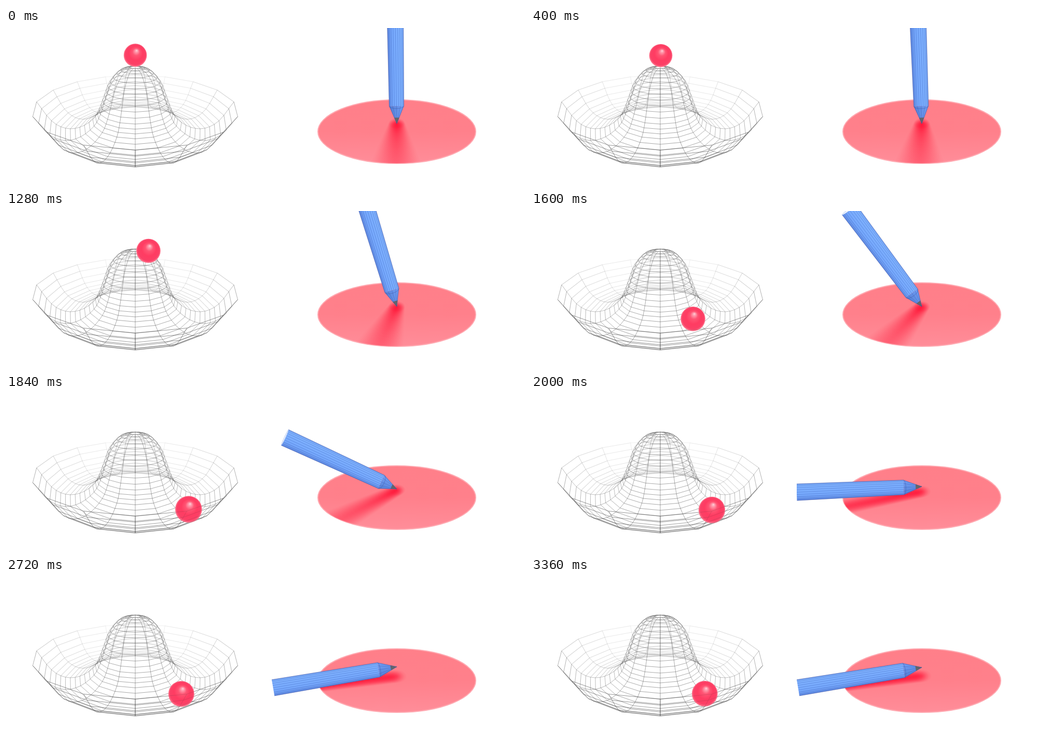
An HTML page with a canvas that plays this animation: 1000x300 px, repeating every 3760 ms.

```html
<!DOCTYPE html>
<html lang="en">
<head>
<meta charset="utf-8">
<title>Unstable equilibrium</title>
<style>
  html, body { margin: 0; width: 100%; height: 100%; overflow: hidden; background: #fff; }
  canvas { display: block; width: 1000px; height: 300px; }
</style>
</head>
<body>
<canvas id="stage" width="1000" height="300"></canvas>
<script>
const stage = document.getElementById('stage');
const ctx = stage.getContext('2d');
const LOOP = 3760, STEP = 80, LAST = 3360;

// Cubic interpolation through rows of [x, value, value, ...].
function curve(rows, x) {
  const last = rows.length - 1;
  x = Math.min(Math.max(x, rows[0][0]), rows[last][0]);
  let i = 0;
  while (i < last - 1 && x > rows[i + 1][0]) i++;
  const a = rows[i], b = rows[i + 1], span = b[0] - a[0], s = (x - a[0]) / span;
  const slope = (k, c) => {
    const p = rows[Math.max(k - 1, 0)], q = rows[Math.min(k + 1, last)];
    return (q[c] - p[c]) / (q[0] - p[0]) * span;
  };
  return a.slice(1).map((v, j) => {
    const c = j + 1, w = b[c], m = slope(i, c), n = slope(i + 1, c);
    return v + s * (m + s * (3 * (w - v) - 2 * m - n + s * (2 * (v - w) + m + n)));
  });
}

// Perspective cameras: x to the right, y away from the viewer, z up.
const camera = (cx, focal, distance, sin, cos, drop) => (x, y, z) => {
  const depth = distance + y * cos - z * sin;
  const scale = focal / depth;
  return { x: cx + x * scale, y: 150 + (drop - z * cos - y * sin) * scale, scale, depth };
};
const hatView = camera(249, 611, 3.23, 0.36, 0.933, 0);
const discView = camera(753, 550, 3.74, 0.332, 0.943, 0.238);
const EYE = [0, -3.448, 1.466];

// ---- Hat ----
const SIDES = 16, SUB = 3;
const profile = [
  [0, .406], [.14, .375], [.25, .26], [.31, .115], [.37, -.04],
  [.44, -.155], [.58, -.245], [.73, -.256], [.87, -.17], [1, .04]
].map((p, i) => [i, ...p]);
const RINGS = (profile.length - 1) * SUB;

function hatPoint(ring, side) {
  const [r, z] = curve(profile, ring / SUB);
  const a = side * 2 * Math.PI / SIDES;
  return hatView(r * Math.sin(a), r * Math.cos(a), z);
}

function wire(g, p, q) {
  const depth = (p.depth + q.depth) / 2;
  const alpha = Math.min(.72, Math.max(.08, .1 + (4.12 - depth) * .4));
  g.strokeStyle = `rgba(60,60,60,${alpha})`;
  g.beginPath();
  g.moveTo(p.x, p.y);
  g.lineTo(q.x, q.y);
  g.stroke();
}

function makeHat(firstRing, frontOnly) {
  const layer = document.createElement('canvas');
  layer.width = 500;
  layer.height = 300;
  const g = layer.getContext('2d');
  g.lineWidth = .75;
  for (let ring = firstRing; ring <= RINGS; ring++) {
    for (let side = 0; side < SIDES; side++) {
      const p = hatPoint(ring, side);
      if (frontOnly && p.depth > 3.1) continue;
      wire(g, p, hatPoint(ring, side + 1));
      if (ring > firstRing) wire(g, p, hatPoint(ring - 1, side));
    }
  }
  return layer;
}
const hat = makeHat(1, false);
const frontWires = makeHat(23, true);

// ---- Ball ----
const ballRadius = [
  [0, .001], [400, .01], [960, .08], [1200, .17], [1400, .32], [1600, .54],
  [1760, .745], [1880, .825], [2000, .79], [2320, .66], [2440, .648],
  [2700, .722], [2960, .695], [3360, .703]
];
const ballHeight = [
  [0, .52], [.08, .505], [.2, .46], [.33, .3], [.43, .05], [.5, -.085],
  [.56, -.127], [.66, -.14], [.72, -.13], [.79, -.09], [.85, -.04]
];

function drawBall(t) {
  const [r] = curve(ballRadius, t);
  const [z] = curve(ballHeight, r);
  const p = hatView(r * .545, -r * .838, z);
  const size = .111 * p.scale;
  const shade = ctx.createRadialGradient(
    p.x + size * .12, p.y - size * .42, 0, p.x, p.y, size);
  shade.addColorStop(0, '#ffd3da');
  shade.addColorStop(.12, '#ff9aac');
  shade.addColorStop(.32, '#ff5473');
  shade.addColorStop(.6, '#ff3c62');
  shade.addColorStop(.88, '#fb4066');
  shade.addColorStop(1, '#ff7b92');
  ctx.save();
  ctx.beginPath();
  ctx.arc(p.x, p.y, size, 0, 2 * Math.PI);
  ctx.fillStyle = shade;
  ctx.fill();
  ctx.clip();
  ctx.globalAlpha = .3;
  ctx.drawImage(frontWires, 0, 0);
  ctx.restore();
}

// ---- Pencil ----
const LENGTH = 1.5, CONE = .245, GIRTH = .094;
const HEADING = [-.942, -.335];
const LANDING = 2033;

const hop = (t, start, span, height) =>
  t > start && t < start + span ? height * (1 - (2 * (t - start) / span - 1) ** 2) : 0;

function pencilPose(t) {
  const fall = 33.5 * Math.exp(.00232 * (t - 1600)) * Math.PI / 180;
  if (t < LANDING) return { tilt: fall, tip: Math.max(0, (t - 1800) / 200) * .043 };
  const rest = .045 + .028 * Math.min(1, (t - LANDING) / 450);
  const tip = rest + hop(t, LANDING, 470, .185) + hop(t, LANDING + 470, 230, .045);
  return { tilt: Math.PI / 2 + Math.asin((tip - .025) / LENGTH), tip };
}

function fillPoly(points, fill) {
  ctx.beginPath();
  points.forEach(([x, y]) => ctx.lineTo(x, y));
  ctx.closePath();
  ctx.fillStyle = fill;
  ctx.fill();
}

function strokeLine(a, b) {
  ctx.beginPath();
  ctx.moveTo(...a);
  ctx.lineTo(...b);
  ctx.stroke();
}

function drawDisc(along) {
  ctx.save();
  ctx.beginPath();
  ctx.ellipse(753, 200.5, 152, 61.5, 0, 0, 2 * Math.PI);
  const base = ctx.createLinearGradient(0, 139, 0, 262);
  base.addColorStop(0, '#ff7f89');
  base.addColorStop(.5, '#ff808b');
  base.addColorStop(1, '#ff8d99');
  ctx.fillStyle = base;
  ctx.fill();
  ctx.strokeStyle = '#ffa8b0';
  ctx.lineWidth = 2;
  ctx.stroke();
  ctx.clip();
  // Soft shadow cast towards the viewer, wider and weaker with height.
  for (let i = 0; i <= 40; i++) {
    const [x, y, z] = along(LENGTH * i / 40);
    const h = Math.max(0, z);
    const p = discView(x, Math.max(-2, y - 1.5 * h), 0);
    const size = (.1 + .2 * h) * p.scale;
    const alpha = .6 / (1 + 12 * h);
    const blob = ctx.createRadialGradient(0, 0, 0, 0, 0, size);
    blob.addColorStop(0, `rgba(255,0,40,${alpha})`);
    blob.addColorStop(.5, `rgba(255,0,40,${alpha * .5})`);
    blob.addColorStop(1, 'rgba(255,0,40,0)');
    ctx.save();
    ctx.translate(p.x, p.y);
    ctx.scale(1.1, .75);
    ctx.fillStyle = blob;
    ctx.fillRect(-size, -size, 2 * size, 2 * size);
    ctx.restore();
  }
  ctx.restore();
}

function drawPencil(along, dir) {
  const tip = discView(...along(0));
  const neck = discView(...along(CONE));
  const end = discView(...along(LENGTH));
  const len = Math.hypot(end.x - neck.x, end.y - neck.y);
  const u = [(end.x - neck.x) / len, (end.y - neck.y) / len];
  const n = [-u[1], u[0]];
  const angle = Math.atan2(n[1], n[0]);
  const at = (p, k) => [p.x + n[0] * k * GIRTH * p.scale, p.y + n[1] * k * GIRTH * p.scale];
  const facing = s => {
    const view = along(s).map((v, i) => EYE[i] - v);
    return view.reduce((sum, v, i) => sum + v * dir[i], 0) / Math.hypot(...view);
  };
  const tipPoint = [tip.x, tip.y];

  const blue = ctx.createLinearGradient(...at(neck, -1), ...at(neck, 1));
  blue.addColorStop(0, '#6794ea');
  blue.addColorStop(.3, '#76a9fd');
  blue.addColorStop(1, '#80b3ff');
  fillPoly([at(neck, -1), at(neck, 1), at(end, 1), at(end, -1)], blue);

  const cone = ctx.createLinearGradient(...at(neck, -1), ...at(neck, 1));
  cone.addColorStop(0, '#5580d6');
  cone.addColorStop(1, '#729ff5');
  fillPoly([at(neck, -1), at(neck, 1), tipPoint], cone);

  ctx.lineWidth = .7;
  ctx.strokeStyle = 'rgba(50,85,175,.5)';
  for (let i = -5; i <= 5; i++) {
    const k = Math.sin(i * Math.PI / 11);
    strokeLine(at(neck, k), at(end, k));
    if (i % 2 === 0) strokeLine(at(neck, k), tipPoint);
  }

  const mix = k => at(neck, k).map((v, i) => v + (tipPoint[i] - v) * .66);
  fillPoly([mix(-1), mix(1), tipPoint], '#62656c');

  const neckFacing = facing(CONE);
  ctx.strokeStyle = 'rgba(60,75,150,.6)';
  ctx.beginPath();
  ctx.ellipse(neck.x, neck.y, GIRTH * neck.scale, GIRTH * neck.scale * Math.abs(neckFacing),
    angle, 0, Math.PI, neckFacing < 0);
  ctx.stroke();

  ctx.strokeStyle = 'rgba(70,75,150,.5)';
  [-1, 1].forEach(k => {
    strokeLine(at(neck, k), at(end, k));
    strokeLine(at(neck, k), tipPoint);
  });

  const endFacing = facing(LENGTH);
  if (endFacing > 0) {
    ctx.beginPath();
    ctx.ellipse(end.x, end.y, GIRTH * end.scale, GIRTH * end.scale * endFacing,
      angle, 0, 2 * Math.PI);
    ctx.fillStyle = '#eef3fc';
    ctx.fill();
    ctx.strokeStyle = 'rgba(110,150,230,.6)';
    ctx.stroke();
  }
}

function drawRight(t) {
  const { tilt, tip } = pencilPose(t);
  const dir = [HEADING[0] * Math.sin(tilt), HEADING[1] * Math.sin(tilt), Math.cos(tilt)];
  const along = s => [dir[0] * s, dir[1] * s, tip + dir[2] * s];
  ctx.save();
  ctx.beginPath();
  ctx.rect(512, 0, 488, 300);
  ctx.clip();
  drawDisc(along);
  drawPencil(along, dir);
  ctx.restore();
}

const start = performance.now();
function render() {
  const elapsed = (performance.now() - start) % LOOP;
  const t = Math.min(LAST, Math.floor(elapsed / STEP) * STEP);
  ctx.fillStyle = '#fff';
  ctx.fillRect(0, 0, 1000, 300);
  ctx.drawImage(hat, 0, 0);
  drawBall(t);
  drawRight(t);
  requestAnimationFrame(render);
}
render();
</script>
</body>
</html>
```
